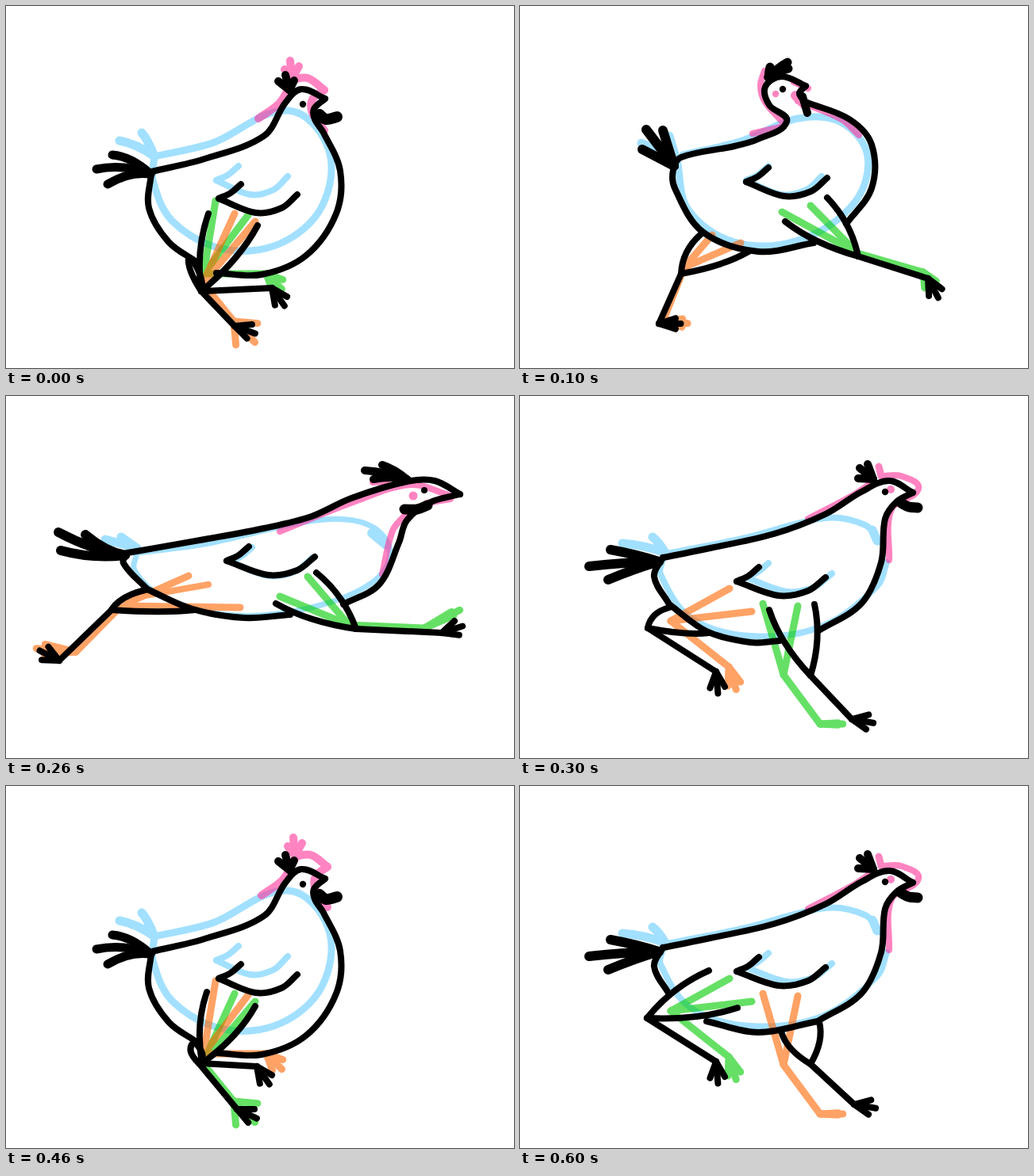
Recreate the animation shown at these times as an HTML page. Size 640 by 457 pixels, loop 0.67 s.

```html
<!DOCTYPE html>
<html lang="en">
<head>
<meta charset="utf-8">
<title>Running hen</title>
<style>
  html, body { margin: 0; width: 100%; height: 100%; overflow: hidden; background: #fff; }
  svg { display: block; width: 100%; height: 100%; }
  path { fill: none; stroke-linecap: round; stroke-linejoin: round; }
</style>
</head>
<body>
<svg id="stage" viewBox="0 0 640 457"></svg>
<script>
const STEP = 100, LOOP = 670;
const COLORS = { blue: '#66ccff', pink: '#ff3399', green: '#00cc00', orange: '#ff6600', ink: '#000' };

// Geometry
const parse = text => text.trim().split(/\s+/).map(p => p.split(',').map(Number));
const sum = (a, b, k = 1) => [a[0] + b[0] * k, a[1] + b[1] * k];
const middle = (a, b) => [(a[0] + b[0]) / 2, (a[1] + b[1]) / 2];
const distance = (a, b) => Math.hypot(a[0] - b[0], a[1] - b[1]);
const direction = (a, b) => sum(b, a, -1).map(v => v / (distance(a, b) || 1));
const polar = (degrees, r) => [Math.cos, Math.sin].map(f => r * f(degrees * Math.PI / 180));

// Smooth curve through all points; handles scale with each segment
function smooth(points) {
  const at = i => points[Math.max(0, Math.min(points.length - 1, i))];
  let d = 'M' + points[0];
  for (let i = 0; i < points.length - 1; i++) {
    const b = at(i), c = at(i + 1), reach = distance(b, c) / 3;
    d += `C${sum(b, direction(at(i - 1), c), reach)} ${sum(c, direction(b, at(i + 2)), -reach)} ${c}`;
  }
  return d;
}

// Every part is a list of strokes { d, width }
const line = (text, width = 8) => text.split('|').map(part => ({ d: smooth(parse(part)), width }));
const dot = (x, y, r) => [{ d: `M${x} ${y}h.01`, width: 2 * r }];
const arc = (a, b, offset, width) => ({ d: `M${a}Q${sum(middle(a, b), offset)} ${b}`, width });

// Feathers from one root, curved up or down by sag
function fan(root, tips, width = 10, sag = 0) {
  const [base] = parse(root);
  return parse(tips).map(tip => arc(base, tip, [0, sag], width));
}

// Three toes around a heading, the middle one longest
function toes(base, heading, length, spread, width) {
  return [-1, 0, 1].map(i =>
    arc(base, sum(base, polar(heading + i * spread, length * (i ? 1 : 1.25))), [0, 0], width));
}

// Points are both ends of the thigh, the knee and the ankle
function leg(points, heading, { width = 8, bow = 12, toe = 22, spread = 25 } = {}) {
  const [a, b, knee, ankle] = parse(points);
  const out = direction(b, a);
  return [
    arc(a, knee, out.map(v => v * bow), width),
    arc(b, knee, out.map(v => -v * bow), width),
    arc(knee, ankle, [0, 0], width),
    ...toes(ankle, heading, toe, spread, width)
  ];
}
const sketchLeg = (points, heading, toe, spread) => leg(points, heading, { width: 9, bow: 0, toe, spread });

function wing(x, y, span) {
  const belly = [[0, 0], [0.47, 18], [0.8, 12], [1, -5]].map(([k, dy]) => [x + k * span, y + dy]);
  return [{ d: smooth([[x + 28, y - 18], [x + 15, y - 7], [x, y]]), width: 8 }, { d: smooth(belly), width: 8 }];
}

// Parts shared by poses of the same kind
const gather = {
  ink: [
    line(`402,117 372,105 352,122 325,164 250,193 184,209 | 183,211 180,255 205,298 240,323 |
      265,337 322,339 378,315 416,262 421,208 400,160 389,143 388,130 402,117`),
    line('395,137 403,143 417,140', 14), dot(374, 124, 4.2),
    fan('357,106', '343,95 352,87 363,94', 10),
    fan('182,212', '134,188 114,206 128,225', 11, -10),
    wing(268, 243, 99)
  ],
  blue: [
    line('187,190 260,173 355,132 406,180 398,253 345,300 275,307 210,272 185,220 187,190', 9),
    fan('187,190', '143,170 171,160', 11, -6), wing(265, 220, 90)
  ],
  pink: [
    line('360,93 380,91 401,106 | 360,96 345,122 318,142 | 401,106 386,118 386,135 401,157', 10),
    fan('360,92', '351,80 358,69 369,76')
  ],
  lifted: sketchLeg('264,246 305,264 249,338 328,338', 45),
  standing: sketchLeg('288,262 314,272 248,350 287,398', 45, 30, 40)
};

const stretch = {
  ink: [
    line(`572,124 540,107 505,108 435,129 385,152 325,167 250,181 153,198 | 153,198 148,211 178,244 |
      425,263 470,238 495,185 505,157 535,134 572,124`),
    line('502,143 518,143 531,138', 13), dot(527, 119, 4),
    fan('505,105', '474,87 452,94 463,105', 10, -4),
    fan('150,201', '66,172 100,175 69,195', 12, 8)
  ],
  blue: [
    line('165,198 162,220 200,255 290,277 385,267 462,235 484,195 455,162 390,157 250,187 165,198', 7),
    line('461,173 479,188', 12), fan('165,192', '125,181 145,178', 11)
  ],
  pink: [
    line('345,171 440,133 510,112 560,126 | 560,130 530,135 | 503,150 487,170 474,225'),
    line('462,109 480,108'), dot(513, 126, 5.5)
  ],
  front: sketchLeg('380,228 345,253 432,289 527,293', -27, 40, 4),
  back: [line('255,238 175,252'), sketchLeg('230,227 295,267 145,265 88,323', 185, 40, 9)]
};

const land = {
  ink: [
    line(`495,122 465,107 430,121 385,149 320,174 230,194 180,204 | 180,204 169,228 188,263 |
      375,297 430,262 455,210 460,155 475,133 495,122`),
    line('480,135 490,140 501,141', 13), dot(460, 121, 4.2),
    fan('445,105', '438,86 428,91 426,104'),
    fan('175,209', '114,194 87,215 111,232', 12, -2),
    wing(273, 234, 112)
  ],
  blue: [
    line('180,205 177,225 215,280 290,303 380,291 450,240 462,210 | 455,185 435,163 385,154 280,180 190,198'),
    line('444,169 450,183', 11), fan('183,198', '129,186 167,178', 11, -4), wing(285, 229, 108)
  ],
  pink: [
    line('363,155 420,125 445,108 | 455,101 480,101 502,117 468,143 465,207', 8),
    line('452,89 455,101', 9), dot(467, 118, 5)
  ],
  front: sketchLeg('306,262 350,265 332,352 378,414', 0, 23, 3),
  back: sketchLeg('264,243 292,272 190,284 263,342', 72, 24, 20)
};

const poses = [
  {
    ...gather, green: gather.lifted, orange: gather.standing,
    ink: [gather.ink, leg('255,262 317,277 246,360 335,356', 55), leg('230,318 236,322 246,360 288,404', 20)]
  },
  {
    ink: [
      line(`360,101 330,89 309,102 314,125 336,146 300,168 270,177 203,191 193,207 195,230 230,285 300,310 370,299 |
        411,275 443,230 443,175 415,143 362,122 | 360,101 352,110 358,120`),
      line('356,114 359,125 362,135', 10), dot(331, 105, 4.2),
      fan('313,90', '315,77 337,71 338,79', 11, -3),
      fan('194,202', '159,156 180,157 154,181', 12),
      wing(285, 222, 102),
      leg('387,242 334,272 426,316 514,344', 62),
      leg('228,288 288,310 203,338 175,401', 0, { spread: 18 })
    ],
    blue: [
      line('198,195 212,257 270,298 350,296 420,250 438,190 405,147 350,142 280,170 205,188', 9),
      fan('197,194', '153,173 188,164', 11), wing(285, 220, 95)
    ],
    pink: [
      line('308,82 303,100 308,120 330,146 | 293,161 332,152 | 345,96 363,104 | 350,120 405,143 427,163'),
      line('347,113 360,126', 12), dot(322, 111, 4.2)
    ],
    green: sketchLeg('330,260 366,252 425,312 508,336', 60, 20),
    orange: sketchLeg('242,289 278,299 207,330 180,398', 5, 25, 12)
  },
  {
    ...stretch, green: stretch.front, orange: stretch.back,
    blue: [stretch.blue, wing(282, 209, 104)],
    ink: [
      stretch.ink, wing(278, 208, 111), line('178,244 235,269 300,280 358,276'),
      leg('391,223 340,262 441,294 549,299', -18), leg('175,245 238,270 133,270 67,334', 207)
    ]
  },
  {
    ...land, green: land.front, orange: land.back,
    ink: [
      land.ink, line('188,263 235,297 290,311 327,309'),
      leg('314,270 371,263 366,353 418,408', 10), leg('188,267 238,299 161,293 247,348', 85)
    ]
  },
  {
    ...gather, green: gather.standing, orange: gather.lifted, headShift: '4 -4',
    ink: [gather.ink, leg('253,260 314,278 247,350 316,354', 55), leg('235,325 240,326 243,350 291,408', 25)]
  },
  {
    ...stretch, green: stretch.back, orange: stretch.front,
    blue: [stretch.blue, wing(281, 216, 107)],
    ink: [
      stretch.ink, wing(278, 208, 111), line('238,268 300,280 365,275 425,263'),
      leg('224,227 275,262 130,271 67,334', 207), leg('428,263 366,276 446,294 549,299', -18)
    ]
  },
  {
    ...land, green: land.back, orange: land.front,
    ink: [
      land.ink, line('235,297 300,311 375,297'),
      leg('238,233 274,280 160,293 247,348', 85), leg('329,310 377,298 366,351 421,402', 10)
    ]
  }
];

function add(parent, tag, attrs) {
  const el = document.createElementNS('http://www.w3.org/2000/svg', tag);
  for (const name in attrs) el.setAttribute(name, attrs[name]);
  return parent.appendChild(el);
}

const stage = document.getElementById('stage');
const groups = poses.map(pose => {
  const group = add(stage, 'g', { visibility: 'hidden' });
  for (const name in COLORS) {
    const layer = add(group, 'g', { stroke: COLORS[name], opacity: name === 'ink' ? 1 : 0.6 });
    if (name === 'pink' && pose.headShift) layer.setAttribute('transform', `translate(${pose.headShift})`);
    for (const { d, width } of pose[name].flat(2)) add(layer, 'path', { d, 'stroke-width': width });
  }
  return group;
});

const start = performance.now();
function render() {
  const time = (performance.now() - start) % LOOP;
  const current = Math.min(groups.length - 1, Math.floor(time / STEP));
  groups.forEach((g, i) => g.setAttribute('visibility', i === current ? 'visible' : 'hidden'));
  requestAnimationFrame(render);
}
render();
</script>
</body>
</html>
```
